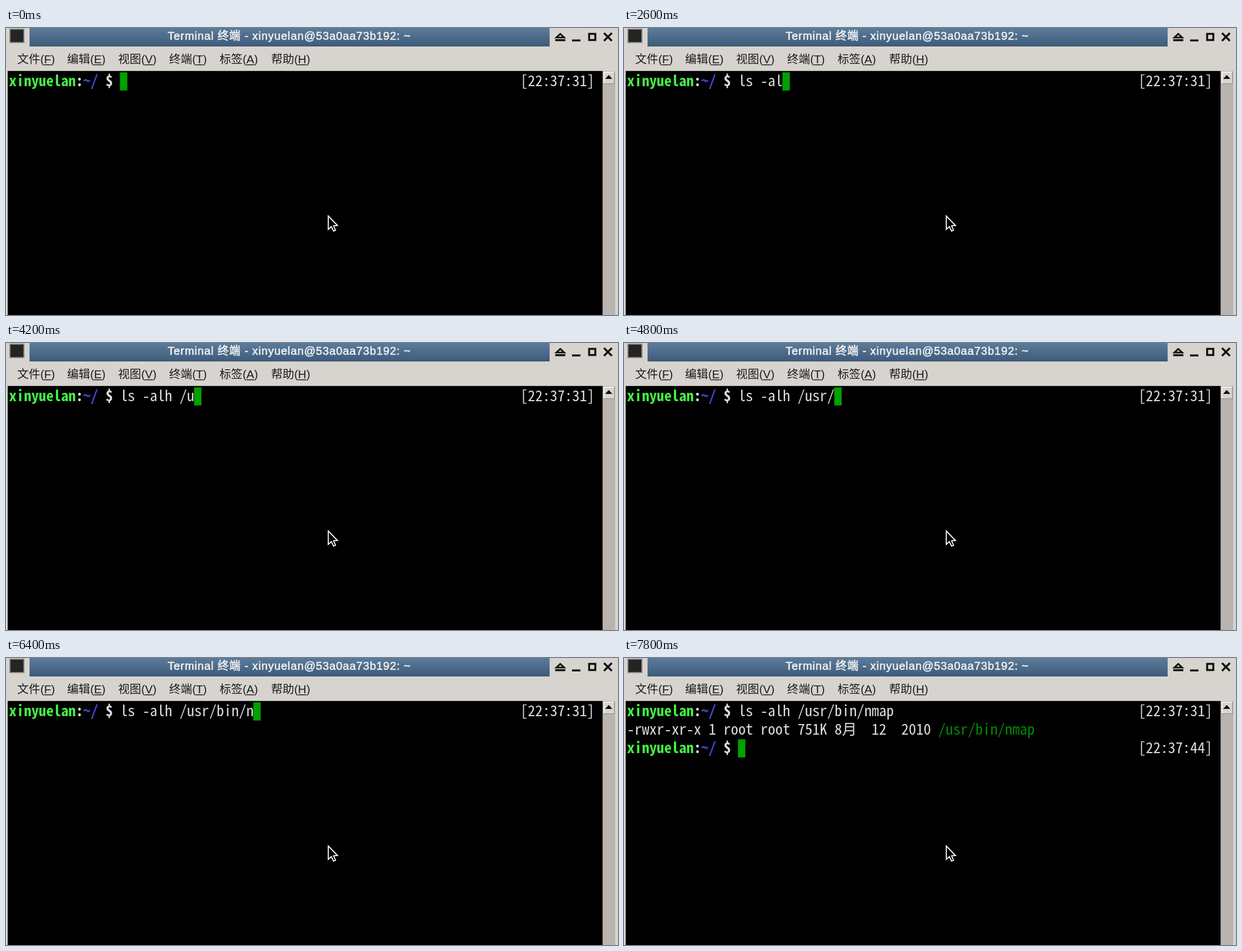
An HTML page with a canvas that plays this animation: 1092x513 px, repeating every 8000 ms.

```html
<!DOCTYPE html>
<html lang="zh">
<head>
<meta charset="utf-8">
<title>Terminal</title>
<style>
html, body { margin: 0; height: 100%; overflow: hidden; background: #000; }
canvas { display: block; }
</style>
</head>
<body>
<canvas id="stage" width="1092" height="513"></canvas>
<script>
const ctx = document.getElementById('stage').getContext('2d');
const LOOP = 8000, CELL = 13.22, LEFT = 4.7, TOP = 79, ROW = 33;
const USER = 'xinyuelan', COMMAND = 'ls -alh /usr/bin/nmap';
const MONO = '"Noto Sans Mono CJK SC", "Noto Sans Mono", monospace';
const SANS = '"Liberation Sans", "Noto Sans CJK SC", sans-serif';
const GREEN = '#45f045', BLUE = '#4646dc', WHITE = '#dedede';

// Moment at which each character of COMMAND is typed
const KEYS = [600, 800, 1200, 2000, 2400, 2600, 2800, 3200,
  3800, 4200, 4400, 4600, 4800, 5000, 5200, 5400, 5600, 6000,
  7000, 7200, 7400];
const ENTER = 7800;

// Font size whose advance equals one terminal cell
ctx.font = '100px ' + MONO;
const monoSize = CELL * 100 / ctx.measureText('m').width;

function rect(x, y, w, h, color) {
  ctx.fillStyle = color;
  ctx.fillRect(x, y, w, h);
}

function path(points, closed) {
  ctx.beginPath();
  points.forEach(([x, y]) => ctx.lineTo(x, y));
  if (closed) ctx.closePath();
}

function put(text, col, row, color, weight = 400) {
  ctx.font = `${weight} ${monoSize}px ${MONO}`;
  ctx.fillStyle = color;
  for (const ch of text) {
    ctx.fillText(ch, LEFT + 0.9 + col * CELL, TOP + row * ROW + 25);
    col += ch > '\u2e80' ? 2 : 1;
  }
}

function prompt(row, clock) {
  put(USER, 0, row, GREEN, 700);
  put(':', 9, row, WHITE, 700);
  put('~/', 10, row, BLUE, 700);
  put('$', 13, row, WHITE, 700);
  put(`[${clock}]`, 69, row, WHITE);
}

function cursor(col, row) {
  rect(LEFT + 0.3 + col * CELL, TOP + 0.3 + row * ROW, CELL, ROW - 0.6, '#00a000');
}

function titleBar() {
  const blue = ctx.createLinearGradient(0, 0, 0, 33);
  blue.addColorStop(0, '#5c7c9c');
  blue.addColorStop(1, '#3d5b79');
  rect(42, 0, 928, 33, blue);
  rect(6, 1, 27, 26, '#8a8a88');
  rect(8, 3, 23, 22, '#242424');

  ctx.font = '20px ' + SANS;
  ctx.letterSpacing = '0.87px';
  ctx.fillStyle = ctx.strokeStyle = '#ededed';
  ctx.lineWidth = 0.7;
  const title = `Terminal 终端 - ${USER}@53a0aa73b192: ~`;
  ctx.fillText(title, 288.5, 21);
  ctx.strokeText(title, 288.5, 21);
  ctx.letterSpacing = '0px';

  ctx.strokeStyle = '#111';
  ctx.lineWidth = 3;
  path([[989, 10.5], [996, 17], [982, 17]], true);
  ctx.stroke();
  rect(980, 20, 18, 3.5, '#111');
  rect(1010, 20.5, 15, 3.5, '#111');
  ctx.lineWidth = 3.5;
  ctx.strokeRect(1040.5, 10.5, 11, 11);
  path([[1067, 9], [1081, 23]]);
  ctx.stroke();
  path([[1081, 9], [1067, 23]]);
  ctx.stroke();
}

function menu() {
  const items = [['文件', 'F', 20], ['编辑', 'E', 109], ['视图', 'V', 200],
    ['终端', 'T', 291], ['标签', 'A', 381], ['帮助', 'H', 473]];
  ctx.font = '20.6px ' + SANS;
  for (const [label, key, x] of items) {
    ctx.fillStyle = '#1c1c1c';
    ctx.fillText(`${label}(${key})`, x, 63);
    const start = x + ctx.measureText(label + '(').width;
    rect(start, 65, ctx.measureText(key).width, 1.5, '#1c1c1c');
  }
}

function scrollBar() {
  rect(1064.5, 77, 22.5, 436, '#b9b4b0');
  rect(1066, 78, 20, 22, '#8c8884');
  rect(1066, 78, 19, 21, '#f2f0ec');
  rect(1068, 80, 17, 19, '#d8d5d0');
  path([[1075.5, 84], [1082, 91], [1069, 91]], true);
  ctx.fillStyle = '#111';
  ctx.fill();
}

function pointer() {
  path([[575, 336], [575, 360], [580.5, 355], [584.5, 363],
    [588, 361.5], [584.5, 353.5], [591.5, 353]], true);
  ctx.fillStyle = '#000';
  ctx.fill();
  ctx.strokeStyle = '#fff';
  ctx.lineWidth = 1.8;
  ctx.stroke();
}

function draw(t) {
  rect(0, 0, 1092, 513, '#d7d4cf');
  titleBar();
  menu();
  rect(3, 76, 1062, 1, '#aeaba6');
  rect(3, 77, 1062, 436, '#000');
  scrollBar();

  const typed = KEYS.filter(k => k <= t).length;
  prompt(0, '22:37:31');
  put(COMMAND.slice(0, typed), 15, 0, WHITE);
  if (t < ENTER) {
    cursor(15 + typed, 0);
  } else {
    put('-rwxr-xr-x 1 root root 751K 8月  12  2010', 0, 1, WHITE);
    put('/usr/bin/nmap', 42, 1, '#008a00');
    prompt(2, '22:37:44');
    cursor(15, 2);
  }
  pointer();
}

function tick() {
  draw(performance.now() % LOOP);
  requestAnimationFrame(tick);
}
tick();
</script>
</body>
</html>
```
